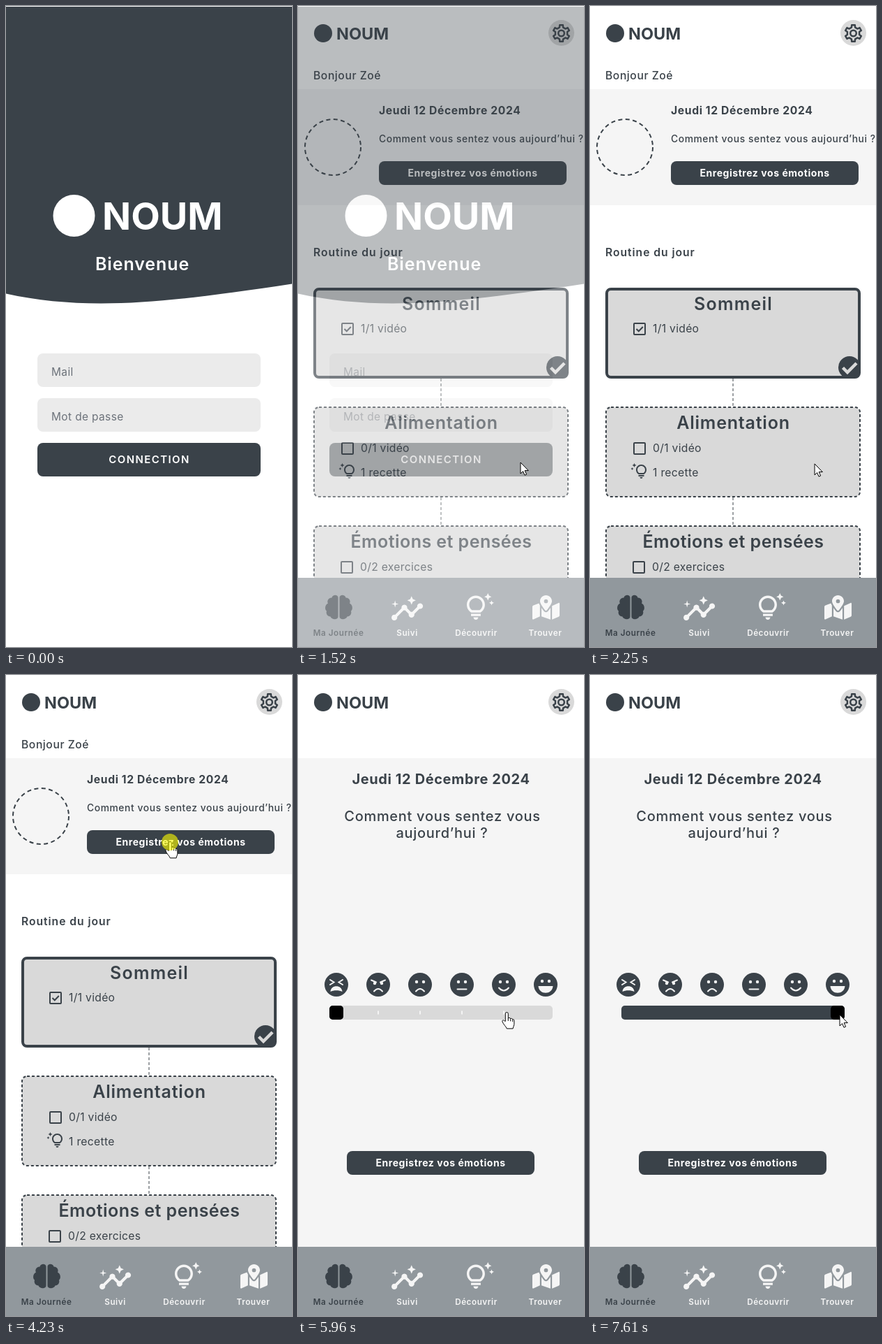
An HTML page that plays this animation: 410x917 px, repeating every 8 s.

```html
<!DOCTYPE html>
<html lang="fr">
<head>
<meta charset="utf-8">
<title>Application bien-être</title>
<style>
html, body { margin: 0; width: 100%; height: 100%; overflow: hidden; background: #fff; }
svg { display: block; width: 100vw; height: 100vh; font-family: Inter, sans-serif; }
text { fill: #3a4249; font-size: 15.7px; letter-spacing: .3px; }
.w5 { font-weight: 500; } .w6 { font-weight: 600; } .w7 { font-weight: 700; }
.mid { text-anchor: middle; }
.white { fill: #fff; }
.dark { fill: #3a4249; }
.line { fill: none; stroke: #3a4249; stroke-width: 2; }
.title { font-size: 25px; font-weight: 600; text-anchor: middle; }
.hint { fill: #6c727a; font-size: 15.5px; letter-spacing: .35px; }
.button { fill: #fff; font-size: 14px; font-weight: 700; letter-spacing: .55px; text-anchor: middle; }
.question { font-size: 20px; font-weight: 500; letter-spacing: .7px; text-anchor: middle; }
.tab { font-size: 11.7px; font-weight: 600; letter-spacing: .55px; text-anchor: middle; }
.light, .tab.light { fill: #f5f5f5; }
.card { fill: #d9d9d9; stroke: #3a4249; stroke-width: 2; stroke-dasharray: 4 3; }
.cursor path { fill: #fff; stroke: #000; stroke-linejoin: round; }
</style>
</head>
<body>
<svg viewBox="0 0 410 917">
  <defs>
    <path id="bulb" fill-rule="evenodd" d="M7 20h4c0 1.1-.9 2-2 2s-2-.9-2-2zM5 19h8v-2H5zM16.5 9.5c0 3.82-2.66 5.86-3.77 6.5H5.27C4.16 15.36 1.5 13.32 1.5 9.5 1.5 5.36 4.86 2 9 2s7.5 3.36 7.5 7.5zM14.5 9.5C14.5 6.47 12.03 4 9 4S3.5 6.47 3.5 9.5c0 2.47 1.49 3.89 2.35 4.5h6.3c.86-.61 2.35-2.03 2.35-4.5zM21.37 7.37L20 8l1.37.63L22 10l.63-1.37L24 8l-1.37-.63L22 6zM19 6l.94-2.06L22 3l-2.06-.94L19 0l-.94 2.06L16 3l2.06.94z"/>
    <rect id="box" x="-8" y="-8" width="16" height="16" rx="1"/>
    <path id="lobe" d="M-1-14C-1-19-9-19-10-14C-16-14-17-8-15.5-6C-20-4-20.5 3-17.5 5C-19 10-15 13-12 13C-10 18-1 18-1 13Z"/>
  </defs>

  <g id="login">
    <path class="dark" d="M0 1H410V397.5C240 423 120 438 0 411.5Z"/>
    <circle class="white" cx="97.5" cy="300" r="30"/>
    <text class="white w7" x="138" y="320" style="font-size:54px;letter-spacing:0">NOUM</text>
    <text class="white w6 mid" x="195.5" y="378" style="font-size:25px;letter-spacing:.9px">Bienvenue</text>
    <g fill="#ebebeb">
      <rect x="45" y="497" width="320" height="48" rx="8"/>
      <rect x="45" y="561" width="320" height="48" rx="8"/>
    </g>
    <text class="hint" x="65" y="529">Mail</text>
    <text class="hint" x="65" y="593">Mot de passe</text>
    <rect class="dark" x="45" y="625" width="320" height="48" rx="8"/>
    <text class="white w6 mid" x="205.5" y="654" style="font-size:15px;letter-spacing:1.4px">CONNECTION</text>
  </g>

  <g id="app">
    <rect class="white" width="410" height="917"/>
    <circle class="dark" cx="36" cy="39" r="13"/>
    <text class="w7" x="55" y="48" style="font-size:23.5px;letter-spacing:0">NOUM</text>
    <circle cx="377.5" cy="38.5" r="18.5" fill="#d9d9d9"/>
    <g class="line" transform="translate(377.5 39)" style="stroke-width:2.5;stroke-linejoin:round">
      <path id="gear"/>
      <circle r="4.3"/>
    </g>

    <g id="home">
      <text class="w5" x="22" y="105" style="letter-spacing:.55px">Bonjour Zoé</text>
      <rect y="119" width="410" height="166" fill="#f5f5f5"/>
      <circle class="line" cx="50" cy="202" r="40" stroke-dasharray="6 4.5"/>
      <text class="w7" x="116" y="155" style="letter-spacing:.62px">Jeudi 12 Décembre 2024</text>
      <text class="w5" x="116" y="195" style="font-size:13.8px;letter-spacing:.6px">Comment vous sentez vous aujourd’hui ?</text>
      <rect class="dark" x="116" y="222" width="269" height="34" rx="8"/>
      <text class="button" x="250.5" y="244">Enregistrez vos émotions</text>
      <text class="w6" x="22" y="358" style="letter-spacing:.95px">Routine du jour</text>

      <rect class="card" x="24" y="405" width="362" height="126" rx="6" style="stroke-width:4;stroke-dasharray:none"/>
      <text class="title" x="205.5" y="435" style="letter-spacing:1.25px">Sommeil</text>
      <use href="#box" class="line" x="71" y="462"/>
      <path class="line" d="M66.5 462l3.3 3.3l6-6.3"/>
      <text x="90" y="467">1/1 vidéo</text>
      <circle class="dark" cx="372" cy="517" r="16"/>
      <path d="M362.5 517.5l6.5 6.5l13-13" fill="none" stroke="#d9d9d9" stroke-width="4.5"/>

      <path class="line" d="M205 533V573M205 703V743" stroke-dasharray="4 3" style="stroke-width:1"/>
      <rect class="card" x="23" y="574" width="364" height="128" rx="7"/>
      <text class="title" x="205.5" y="605" style="letter-spacing:.8px">Alimentation</text>
      <use href="#box" class="line" x="71" y="633"/>
      <text x="90" y="638">0/1 vidéo</text>
      <use href="#bulb" class="dark" transform="translate(82.5 654) scale(-1 1)"/>
      <text x="90" y="673">1 recette</text>

      <rect class="card" x="23" y="744" width="364" height="128" rx="7"/>
      <text class="title" x="205.5" y="775" style="letter-spacing:.45px">Émotions et pensées</text>
      <use href="#box" class="line" x="70" y="803"/>
      <text x="89" y="808">0/2 exercices</text>
    </g>

    <g id="mood">
      <rect y="119" width="410" height="699" fill="#f5f5f5"/>
      <text class="w7 mid" x="205" y="156" style="font-size:20px;letter-spacing:.6px">Jeudi 12 Décembre 2024</text>
      <text class="question" x="207" y="209">Comment vous sentez vous</text>
      <text class="question" x="206.5" y="233">aujourd’hui ?</text>
      <g id="faces"></g>
      <rect x="45" y="473" width="320" height="20" rx="5" fill="#d9d9d9"/>
      <path d="M115 480.5v5m60-5v5m60-5v5m60-5v5" stroke="#f5f5f5" stroke-width="2"/>
      <rect id="fill" class="dark" x="45" y="473" height="20" rx="5"/>
      <rect id="thumb" y="473" width="20" height="20" rx="5"/>
      <rect class="dark" x="70" y="681" width="269" height="34" rx="8"/>
      <text class="button" x="204.5" y="703">Enregistrez vos émotions</text>
    </g>

    <rect y="818" width="410" height="99" fill="#91989d"/>
    <g class="dark" transform="translate(58.5 860.5)">
      <use href="#lobe"/><use href="#lobe" transform="scale(-1 1)"/>
    </g>
    <g class="light">
      <path transform="translate(132 838) scale(2.05)" d="M21 8c-1.45 0-2.26 1.44-1.93 2.51l-3.55 3.56c-.3-.09-.74-.09-1.04 0l-2.55-2.55C12.27 10.45 11.46 9 10 9c-1.45 0-2.27 1.44-1.93 2.52l-4.56 4.55C2.44 15.74 1 16.55 1 18c0 1.1.9 2 2 2 1.45 0 2.26-1.44 1.93-2.51l4.55-4.56c.3.09.74.09 1.04 0l2.55 2.55C12.73 16.55 13.54 18 15 18c1.45 0 2.27-1.44 1.93-2.52l3.56-3.55C21.56 12.26 23 11.45 23 10c0-1.1-.9-2-2-2zM15 9l.94-2.07L18 6l-2.06-.93L15 3l-.92 2.07L12 6l2.08.93zM3.5 11L4 9l2-.5L4 8l-.5-2L3 8l-2 .5L3 9z"/>
      <use href="#bulb" transform="translate(239.4 840) scale(1.73)"/>
      <path transform="translate(336 843) scale(.0677)" fill-rule="evenodd" d="M288 0c-70 0-126 56-126 126 0 56 82 159 114 196 6 8 18 8 24 0C332 285 414 182 414 126 414 56 358 0 288 0zM288 168a42 42 0 1 1 0-84a42 42 0 0 1 0 84zM20 216A32 32 0 0 0 0 246V496c0 11 11 19 22 15L160 448V215c-9-16-16-32-21-46zM288 360c-14 0-27-6-37-17-19-23-40-50-59-77V448l192 64V266c-19 27-40 54-59 77-10 11-23 17-37 17zM554 161L416 224V512l140-56A32 32 0 0 0 576 426V176c0-11-11-19-22-15z"/>
    </g>
    <text class="tab" x="58" y="901">Ma Journée</text>
    <text class="tab light" x="156.5" y="901">Suivi</text>
    <text class="tab light" x="255.5" y="901">Découvrir</text>
    <text class="tab light" x="354.5" y="901">Trouver</text>
  </g>

  <g id="cursor" class="cursor">
    <path id="arrow" d="M0 0V16L3.6 12.6L6 18.2L8.6 17.1L6.2 11.6H11.3Z"/>
    <g id="hand" transform="translate(.3 -.7)">
      <path d="M-2 13V2.2a2 2 0 0 1 4 0V9a1.8 1.8 0 0 1 3.4.6a1.7 1.7 0 0 1 3 1a1.4 1.4 0 0 1 2.2 1.2V17c0 2-1.4 4-1.8 6.5H0C-.5 21-5 17.5-6.3 13.5c-.7-2 1.5-2.8 2.8-1.2z"/>
      <path d="M2 9v3.5M5.4 10v3M8.4 11v2.5"/>
    </g>
    <circle id="click" r="12" fill="#ff0" opacity=".6"/>
  </g>
</svg>
<script>
const LOOP = 8000;
const el = id => document.getElementById(id);
const show = (id, on) => { el(id).style.display = on ? '' : 'none'; };
const within = (t, spans) => spans.some(([a, b]) => t >= a && t < b);
const easeOut = (t, start, length) => {
  const p = Math.min(1, Math.max(0, (t - start) / length));
  return 1 - (1 - p) ** 2;
};

// Six teeth: two outer and two inner corners each
let gear = '';
for (let i = 0; i < 6; i++) {
  for (const [deg, r] of [[-17, 8.8], [-11, 12], [11, 12], [17, 8.8]]) {
    const a = (i * 60 + deg) * Math.PI / 180;
    gear += (gear ? 'L' : 'M') + (r * Math.sin(a)).toFixed(2) + ' ' + (-r * Math.cos(a)).toFixed(2);
  }
}
el('gear').setAttribute('d', gear + 'Z');

// Each face: stroked features, filled features
const frown = 'M-6 9.5Q0 2.5 6 9.5';
const eye = (x, y) => `M${x - 2.2} ${y}a2.2 2.2 0 1 0 4.4 0a2.2 2.2 0 1 0-4.4 0`;
const eyes = y => eye(-5, y) + eye(5, y);
const faces = [
  ['M-9-7l5.5 3.5l-5.5 3.5M9-7l-5.5 3.5l5.5 3.5', 'M-8.5 10C-8-.5 8-.5 8.5 10C4 7.5-4 7.5-8.5 10Z'],
  ['M-10-6.5l7 3M10-6.5l-7 3' + frown, eyes(-2)],
  [frown, eyes(-4)],
  ['M-6.5 6.5H6.5', eyes(-4)],
  ['M-7 4.5Q0 12.5 7 4.5', eyes(-4)],
  ['', eyes(-5) + 'M-10.5 2H10.5C9.5 15-9.5 15-10.5 2Z']
];
el('faces').innerHTML = faces.map(([stroked, filled], i) =>
  `<g transform="translate(${55 + 60 * i} 443)"><circle class="dark" r="17"/>` +
  `<path d="${stroked}" fill="none" stroke="#f5f5f5" stroke-width="2" stroke-linecap="round"/>` +
  `<path class="light" d="${filled}"/></g>`).join('');

// Pointer path: time, x, y
const path = [
  [730, 398, 673], [990, 319, 653], [2240, 319, 653], [2250, 322, 655], [2400, 327, 645],
  [2540, 316, 560], [2700, 290, 440], [2850, 263, 330], [2980, 245, 262], [3040, 239, 249],
  [3100, 239, 249], [3170, 235, 239], [5010, 235, 239], [5150, 250, 300], [5350, 285, 420],
  [5550, 308, 498], [5690, 311, 494], [5820, 311, 494], [5900, 299, 483], [6700, 299, 484],
  [6880, 354, 486], [7010, 354, 486], [7090, 358, 486], [LOOP, 358, 486]
];
const hands = [[840, 1450], [3110, 4420], [5830, 6490], [6880, 7610]];
const clicks = [[1260, 1390], [4230, 4360], [6090, 6220], [7020, 7150]];

function pointerAt(t) {
  const i = Math.max(1, path.findIndex(k => k[0] > t));
  const [t0, x0, y0] = path[i - 1], [t1, x1, y1] = path[i];
  const p = (t - t0) / (t1 - t0);
  return [x0 + (x1 - x0) * p, y0 + (y1 - y0) * p];
}

function draw() {
  const t = performance.now() % LOOP;
  el('app').style.opacity = easeOut(t, 1406, 280);
  show('home', t < 4360);
  show('mood', t >= 4360);

  const slide = 240 * easeOut(t, 6150, 340) + 60 * easeOut(t, 7140, 410);
  el('thumb').setAttribute('x', 45 + slide);
  el('fill').setAttribute('width', 20 + slide);

  show('cursor', t >= 730);
  if (t >= 730) el('cursor').setAttribute('transform', `translate(${pointerAt(t)})`);
  const hand = within(t, hands);
  show('hand', hand);
  show('arrow', !hand);
  show('click', within(t, clicks));
  requestAnimationFrame(draw);
}
draw();
</script>
</body>
</html>
```
